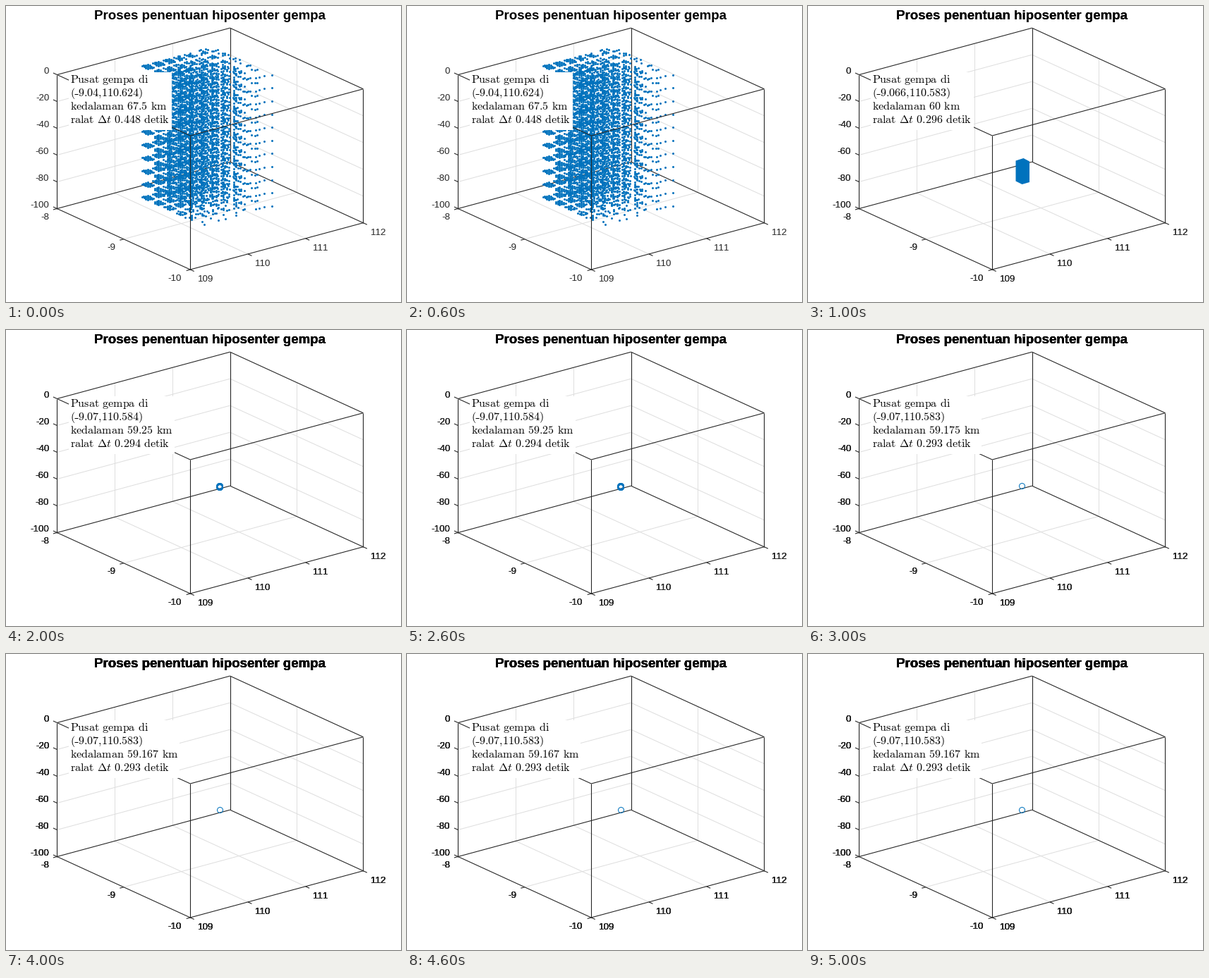
A matplotlib script that plays this animation: 560 px wide and 420 px high, repeating every 6000 ms.

```python
import numpy as np
import matplotlib.pyplot as plt
from matplotlib.animation import FuncAnimation
from matplotlib.patches import Polygon, Rectangle

plt.rcParams["font.family"] = "Liberation Sans"
plt.rcParams["mathtext.fontset"] = "cm"
plt.rcParams["text.kerning_factor"] = 6  # no kerning

W, H, DPI = 560, 420, 80
PX = 72 / DPI  # points per pixel
BLUE, INK = "#0072bd", "#262626"

# Latitude, longitude, depth and residual of each search step
STEPS = [
    ("-9.04", "110.624", "67.5", "0.448"),
    ("-9.066", "110.583", "60", "0.296"),
    ("-9.07", "110.584", "59.25", "0.294"),
    ("-9.07", "110.583", "59.175", "0.293"),
    ("-9.07", "110.583", "59.167", "0.293"),
    ("-9.07", "110.583", "59.167", "0.293"),
]
NOTE_RIGHT = [235, 235, 239, 246, 246, 246]

fig = plt.figure(figsize=(W / DPI, H / DPI), dpi=DPI, facecolor="white")
ax = fig.add_axes([0, 0, 1, 1])


def project(lon, lat, z):
    """Stage position of a point in the box."""
    u, v, w = (lon - 109) / 3, (-8 - lat) / 2, -z / 100
    return np.array([72.4 + 245.2 * u + 188.8 * v,
                     97.5 - 66.3 * u + 86.5 * v + 190 * w])


def segment(p, q, color=INK, width=1.1, z=1):
    ax.plot([p[0], q[0]], [p[1], q[1]], color=color, lw=width * PX,
            solid_capstyle="butt", zorder=z)


def edge(a, b, **style):
    segment(project(*a), project(*b), **style)


def label(x, y, text, copies, size=13.33, color=INK, **style):
    for _ in range(copies):
        ax.text(x, y, text, size=size * PX, color=color, zorder=8, **style)


def draw_grid():
    style = dict(color="#dedede", width=1, z=0)
    for z in range(-80, 0, 20):
        edge((109, -8, z), (112, -8, z), **style)
        edge((112, -8, z), (112, -10, z), **style)
    for lon in (110, 111):
        edge((lon, -8, 0), (lon, -8, -100), **style)
        edge((lon, -8, -100), (lon, -10, -100), **style)
    edge((112, -9, 0), (112, -9, -100), **style)
    edge((109, -9, -100), (112, -9, -100), **style)


def draw_box():
    for z in (0, -100):
        edge((109, -8, z), (112, -8, z))
        edge((112, -8, z), (112, -10, z))
        edge((109, -8, z), (109, -10, z), z=4)
        edge((109, -10, z), (112, -10, z), z=4)
    edge((112, -8, 0), (112, -8, -100))
    for lon, lat in ((109, -8), (112, -10), (109, -10)):
        edge((lon, lat, 0), (lon, lat, -100), z=4)


def draw_ticks(copies):
    for i, z in enumerate(range(0, -101, -20)):
        p = project(109, -8, z)
        segment(p, p + (-5.5, -2.5))
        label(61.2, 96 + 37.9 * i, str(z), copies, ha="right")
    for i, lat in enumerate((-8, -9, -10)):
        p = project(109, lat, -100)
        segment(p, p + (-5.5, 1.5))
        label(61.2 + 94 * i, 302.8 + 43.4 * i, str(lat), copies, ha="right")
    for i, lon in enumerate(range(109, 113)):
        p = project(lon, -10, -100)
        segment(p, p + (5.5, 2.5))
        label(271.6 + 81.8 * i, 391.3 - 22.1 * i, str(lon), copies)


def draw_note(step):
    lat, lon, depth, error = STEPS[step]
    ax.add_patch(Rectangle((88.5, 94), NOTE_RIGHT[step] - 88.5, 82,
                           fc="white", ec="none", zorder=6))
    rows = [
        r"\mathrm{Pusat~gempa~di}",
        r"\mathrm{(~" + lat[1:] + "{,}" + lon + ")}",
        r"\mathrm{kedalaman~" + depth + "~km}",
        r"\mathrm{ralat~}\Delta t\mathrm{~" + error + "~detik}",
    ]
    for i, row in enumerate(rows):
        text = "$" + row.replace("~", r"\hspace{0.38}") + "$"
        label(90.7, 109 + 19 * i, text, 1, size=16, color="black")
    segment((97.2, 124.5), (101.7, 124.5), color="black", width=1, z=8)  # hyphen


def draw_cloud():
    # Diamond-shaped clusters of a 4 x 4 lattice, thinning to the right and front
    rng = np.random.default_rng(4)
    du, dv = np.array([15.1, -4.1]), np.array([15.4, 7.1])
    layer = []
    for i in range(7):
        for j in range(6):
            n = 2 + round(14 * (1 - (j / 5) ** 2) * (1 - (i / 7) ** 2))
            a, b = np.divmod(rng.choice(16, n, replace=False), 4)
            u, v = i + 0.18 * (a - 1.5), j + 0.18 * (b - 1.5)
            layer.append(np.outer(u, du) + np.outer(v, dv))
    layer = np.vstack(layer) + (201, 86)
    dots = np.vstack([layer + (0, 18.6 * k) for k in range(11)])
    ax.scatter(dots[:, 0], dots[:, 1], s=(3 * PX) ** 2, color=BLUE,
               linewidths=0, zorder=3)


def draw_block():
    ax.add_patch(Polygon([(294.5, 219.5), (305.5, 216), (314, 220.5),
                          (314, 250), (303.5, 253), (294.5, 248.5)],
                         fc=BLUE, ec="none", zorder=3))


def draw_rings(centers):
    x, y = zip(*centers)
    ax.plot(x, y, "o", ms=8 * PX, mfc="none", mec=BLUE, mew=PX, zorder=3)


def draw(step):
    ax.clear()
    ax.set_xlim(0, W)
    ax.set_ylim(H, 0)
    ax.set_axis_off()

    draw_grid()
    draw_box()
    # Lettering is painted over itself at each step, so it grows heavier
    draw_ticks(step + 1)
    label(289.4, 19, "Proses penentuan hiposenter gempa", step + 1,
          size=18.75, color="black", weight="bold", ha="center")

    if step == 0:
        draw_cloud()
    elif step == 1:
        draw_block()
    elif step == 2:
        draw_rings([(302.6 + dx, 222 + dy) for dx in (-0.8, 0, 0.8)
                    for dy in (-0.8, 0, 0.8)])
    else:
        draw_rings([(302.8, 221.3)])
    draw_note(step)
    return []


anim = FuncAnimation(fig, draw, frames=len(STEPS), interval=1000,
                     init_func=lambda: draw(0), repeat=True, repeat_delay=0)
plt.show()
```
